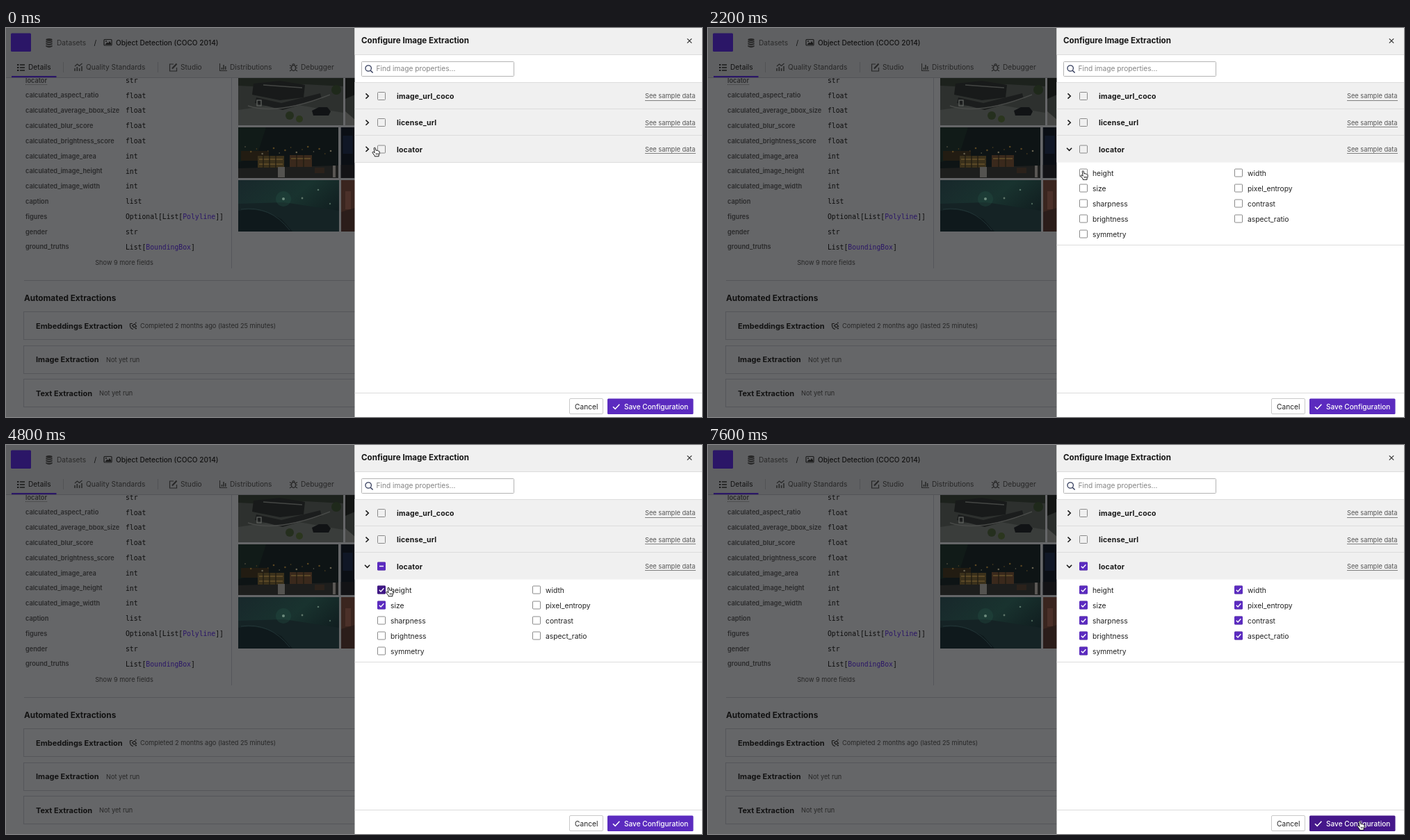
An HTML page for the animation above (8 s loop, 1001 px wide and 560 px high).

```html
<!DOCTYPE html>
<html lang="en">
<head>
<meta charset="utf-8">
<title>Configure Image Extraction</title>
<style>
  html, body { margin: 0; width: 100%; height: 100%; overflow: hidden; background: #fff; }
  svg { display: block; }
  text { font-family: Inter, "Open Sans", sans-serif; white-space: pre; }
  .mono { font-family: "DejaVu Sans Mono", monospace; }
</style>
</head>
<body>
<svg id="stage" width="1001" height="560" viewBox="0 0 1001 560"></svg>
<script>
const stage = document.getElementById('stage');
const PURPLE = '#5b2bbf', DARK = '#3f1785', DIM_PURPLE = '#2b1667';

// ---- drawing helpers (strings of SVG) ----
const text = (x, mid, size, fill, str, extra = '') =>
  `<text x="${x}" y="${mid + size * 0.36}" font-size="${size}" fill="${fill}" ${extra}>${str}</text>`;
const bold = (x, mid, size, fill, str, extra = '') =>
  text(x, mid, size, fill, str, 'font-weight="700" ' + extra);
const rect = (x, y, w, h, fill, extra = '') =>
  `<rect x="${x}" y="${y}" width="${w}" height="${h}" fill="${fill}" ${extra}/>`;
const line = (d, stroke, width = 1, extra = '') =>
  `<path d="${d}" fill="none" stroke="${stroke}" stroke-width="${width}" ${extra}/>`;
const dot = (x, y, r, fill, extra = '') =>
  `<circle cx="${x}" cy="${y}" r="${r}" fill="${fill}" ${extra}/>`;
const shape = (d, fill) => `<path d="${d}" fill="${fill}"/>`;
const frame = (x, y, w, h, body) =>
  `<svg x="${x}" y="${y}" width="${w}" height="${h}" viewBox="0 0 ${w} ${h}">${body}</svg>`;

// ---- dimmed page on the left ----
const fields = [
  ['locator', 'str'], ['calculated_aspect_ratio', 'float'],
  ['calculated_average_bbox_size', 'float'], ['calculated_blur_score', 'float'],
  ['calculated_brightness_score', 'float'], ['calculated_image_area', 'int'],
  ['calculated_image_height', 'int'], ['calculated_image_width', 'int'],
  ['caption', 'list'], ['figures', 'Optional[List[<tspan>Polyline</tspan>]]'],
  ['gender', 'str'], ['ground_truths', 'List[<tspan>BoundingBox</tspan>]']
];

function photos() {
  const train = rect(0, 0, 151, 68, '#2d302e') +
    shape('M0 0H151V12L96 9 60 14 0 11Z', '#1d221d') +
    shape('M0 46 70 36 151 50V68H0Z', '#3a3d3b') +
    shape('M22 8 60 4 96 10 94 28 60 32 20 24Z', '#181a1a') +
    shape('M26 28 62 36 118 22 120 30 64 46 24 36Z', '#1b1d1d') +
    line('M14 40Q56 54 132 24', '#484a48', 1.4) + line('M36 10 92 14', '#444644', 1.6) +
    shape('M106 47l10-5h12l5 6-3 6h-22Z', '#111315') +
    rect(27, 32, 6, 8, 'none', 'stroke="#5f625f" stroke-width="1.3"') +
    dot(74, 54, 6, '#252f1e') + dot(88, 59, 5, '#2b361e') + dot(141, 17, 7, '#1f291b');
  let lamps = '';
  for (let i = 0; i < 16; i++)
    lamps += dot(10 + i * 8.2, 28 + (i * 7) % 11, .8 + i % 2 * .5, i % 3 ? '#594622' : '#66614f');
  const night = rect(0, 0, 144, 74, '#0e1415') +
    shape('M0 0H40L26 44 0 50Z', '#111b18') + shape('M0 59 144 55V74H0Z', '#1d1e1d') +
    rect(4, 34, 40, 14, '#221c12') + rect(28, 41, 38, 17, '#3b311b') + rect(74, 40, 32, 17, '#3a291c') +
    line('M30 46H64M76 45H104M30 53H64', '#65522b', 1.4) +
    line('M36 41V58M45 41V58M54 41V58M84 40V57M94 40V57', '#211d13', 1.4) + lamps +
    rect(57, 57, 10, 15, '#545350') + rect(136, 55, 4, 17, '#5a5754') + rect(110, 58, 14, 8, '#2b221b');
  const road = rect(0, 0, 145, 74, 'url(#teal)') +
    shape('M0 34 66 32 145 44V74H0Z', '#152325') +
    shape('M0 44Q30 38 62 56L78 74H0Z', '#0f191c') +
    line('M4 42Q46 36 74 72', '#223537', 1) +
    dot(65, 27, 11, '#29574a', 'opacity=".3"') + dot(65, 27, 2, '#6c8b7d') +
    dot(115, 14, 1.3, '#58766a') + dot(92, 26, 1.4, '#5d7468') + dot(132, 34, 1.2, '#4b6559');
  return frame(334, 72, 151, 68, train) +
    frame(488, 72, 14, 68, rect(0, 0, 14, 68, '#131514') + shape('M0 30 14 24V68H0Z', '#2a2d2b') + shape('M0 48 14 60V68H0Z', '#474846')) +
    frame(334, 143, 144, 73, night) +
    frame(481.5, 143, 20, 73, rect(0, 0, 20, 73, '#0b0f15') + rect(3, 12, 14, 26, '#101726') + rect(0, 54, 20, 19, '#131316')) +
    frame(334, 219, 145, 74, road) +
    frame(482, 219, 20, 74, rect(0, 0, 20, 74, '#3a251f') + shape('M0 46 20 40V74H0Z', '#2b1d1a') + rect(6, 16, 8, 26, '#4b3029'));
}

function icons() {
  const ink = '#1a1a1a', dim = '#272727';
  return `<g fill="${dim}"><ellipse cx="62" cy="17" rx="4.6" ry="1.9"/>` +
    [19, 22.2, 25.4].map(y => `<path d="M57.4 ${y - .6}q4.6 2.6 9.2 0v2q-4.6 2.8-9.2 0z"/>`).join('') + '</g>' +
    rect(141, 16.5, 11, 8.5, 'none', `stroke="${ink}" stroke-width="1.2" rx="1"`) +
    shape('M142.5 24 145.5 20.5 147 22 149 19 151 22V24Z', ink) + dot(144, 19, 1, ink) +
    line('M20 53H27M20 57H27M20 61H27', ink, 1.3) + line('M16 53H18.4M16 57H18.4M16 61H18.4', ink, 2) +
    line('M99 62V58M102.3 62V56M105.6 62V58M109 62V55', dim, 1.5) + line('M99 55 102.5 52 105.5 54.5 109.5 51', dim, 1.1) +
    line('M241 52H235.5V62H245.5V57', dim, 1.2) + line('M239 58.5 245.5 51.5', dim, 2) +
    line('M307.5 51V61.5H318', dim, 1.1) + line('M310.5 60V57M313 60V53M315.7 60V55', dim, 1.5) +
    `<ellipse cx="413.5" cy="57.5" rx="3" ry="4" fill="none" stroke="${dim}" stroke-width="1.3"/>` +
    line('M408 53.5 410.8 55.5M408 57.5H410.5M408 62 411 60M419 53.5 416.2 55.5M419 57.5H416.5M419 62 416 60M411.5 53Q413.5 50 415.5 53', dim, 1.1) +
    line('M178.5 425.5H182M178.5 425.5V429Q179 433 183 433.5', ink, 1.2) +
    line('M181.5 428.5 185 426 187.5 429.5 184 431Z', ink, 1.2) + line('M185.5 432.5H188M186 424.5H187.5', ink, 1.3);
}

function page() {
  const ink = '#121212', soft = '#272727', rule = '#55565a';
  let s = rect(0, 0, 502, 560, '#656668');
  fields.forEach(([name, type], i) => {
    const y = 75.2 + i * 21.8;
    s += text(28, y, 9.2, '#2a2a2b', name, 'font-weight="600"') +
      text(172, y, 9.76, '#0d0d0d', type.replace('<tspan', `<tspan fill="${DIM_PURPLE}"`), 'class="mono"');
  });
  s += line('M28 81.5H60', '#383838', 1, 'stroke-dasharray="1 1"');
  s += line('M324.5 72V346M26 363.5H502', rule) + photos();
  s += text(170, 338, 9.2, soft, 'Show 9 more fields', 'text-anchor="middle"');
  s += bold(26, 389, 11.8, ink, 'Automated Extractions');
  [['Embeddings Extraction', 193, 'Completed 2 months ago (lasted 25 minutes)'],
   ['Image Extraction', 144, 'Not yet run'], ['Text Extraction', 134, 'Not yet run']]
    .forEach(([title, x, note], i) => {
      const y = 408.5 + i * 48.5;
      s += rect(25.5, Math.floor(y) + .5, 500, 40, 'none', `stroke="${rule}"`) +
        bold(43, y + 20.2, 11, ink, title) + text(x, y + 20.2, 9.2, soft, note);
    });
  s += rect(0, 0, 502, 71, '#5f6062') + line('M0 71.5H502', '#535457');
  s += rect(7, 7.5, 29, 26.5, DIM_PURPLE, 'rx="1.5"');
  s += text(73, 21, 10.2, '#2a2a2a', 'Datasets') + text(126.5, 21, 10.2, ink, '/') +
    text(158, 21, 10.1, ink, 'Object Detection (COCO 2014)', 'font-weight="500"');
  [[32, 'Details'], [115, 'Quality Standards'], [251, 'Studio'], [322, 'Distributions'], [424, 'Debugger']]
    .forEach(([x, name], i) => s += text(x, 56.5, 10.2, i ? soft : ink, name));
  s += line('M82.5 49V64M218.5 49V64', '#515255') + rect(8, 69, 64.5, 2.2, DIM_PURPLE);
  return s + icons();
}

// ---- side panel ----
const options = [];
['height', 'size', 'sharpness', 'brightness', 'symmetry'].forEach((n, i) => options.push([534, 208.5 + i * 22, n]));
['width', 'pixel_entropy', 'contrast', 'aspect_ratio'].forEach((n, i) => options.push([757, 208.5 + i * 22, n]));

const box = (x, mid) => rect(x + .5, mid - 5.5, 11, 11, 'none', 'stroke="#8a8a8a" rx="1"');
const liveBox = (id, x, mid) => box(x, mid) + `<g id="${id}">` +
  rect(x, mid - 6, 12, 12, PURPLE, 'rx="1.2"') +
  line(`M${x + 2.8} ${mid + .2}l2.3 2.3 4.3-4.7`, '#fff', 1.4, 'class="tick"') +
  line(`M${x + 3} ${mid}h6`, '#fff', 1.5, 'class="dash"') + '</g>';

function panel() {
  const grey = '#f0f0f0', rule = '#dcdcdc';
  let s = rect(501.5, 0, 500, 560, '#fff') + rect(501.5, 0, 500, 38, grey) + line('M501.5 38.5H1001', rule);
  s += bold(511, 18.3, 11.6, '#161616', 'Configure Image Extraction');
  s += line('M979.8 15.3 986.2 21.7M986.2 15.3 979.8 21.7', '#333', 1.2);
  s += rect(511.5, 48.5, 219, 21, '#fff', 'stroke="#b4b4b4" rx="1"') +
    dot(521.2, 58, 4.2, 'none', 'stroke="#333c5c" stroke-width="1.3"') + line('M524.3 61.2 527.6 64.5', '#333c5c', 1.5) +
    text(532.5, 58.7, 10.2, '#858585', 'Find image properties...');
  s += rect(501.5, 78, 500, 115.5, grey) + line('M501.5 78.5H1001M501.5 116.5H1001M501.5 154.5H1001', rule);
  ['image_url_coco', 'license_url', 'locator'].forEach((name, i) => {
    const y = 98 + i * 38.2;
    s += bold(562, y + .5, 10.4, '#161616', name, 'letter-spacing=".2"') +
      text(919, y, 9.25, '#555', 'See sample data') +
      line(`M919 ${Math.floor(y + 6) + .5}H992`, '#808080');
    if (i < 2) s += line(`M517.5 ${y - 3.6}l3.8 3.6-3.8 3.6`, '#161616', 1.5) + box(534, Math.floor(y));
  });
  s += '<g id="closed">' + line('M517.5 170.8l3.8 3.6-3.8 3.6', '#161616', 1.5) + line('M501.5 193.5H1001', rule) + '</g>';
  s += liveBox('all', 534, 174.5);
  s += '<g id="open">' + line('M516 172.8l3.6 3.6 3.6-3.6', '#161616', 1.5) + line('M501.5 312.5H1001', rule);
  options.forEach(([x, y, name], i) => s += liveBox('opt' + i, x, y) + text(x + 19, y + .6, 10.3, '#222', name));
  s += '</g>' + line('M501.5 525.5H1001', rule);
  s += rect(810.5, 533.5, 48, 22, '#fff', 'stroke="#c9c9c9" rx="1.5"') +
    text(834.7, 545, 10.2, '#222', 'Cancel', 'text-anchor="middle"');
  s += '<rect id="save" x="865" y="533.5" width="123.5" height="22.5" rx="1.5"/>' +
    line('M873 545.2l3.2 3.2 6.2-6.6', '#fff', 1.5) +
    text(889, 545, 10.1, '#fff', 'Save Configuration', 'font-weight="500"');
  return s;
}

const pointer = `<g id="pointer" stroke="#000" stroke-width=".9" stroke-linejoin="round" fill="#fff">
  <path id="arrow" fill="#000" stroke="#fff" stroke-width=".7" d="M0 0V10.4L2.4 8.2 4 12 5.8 11.2 4.2 7.6H7.4Z"/>
  <g id="hand" transform="translate(-.6 -.6)">
  <path d="M-1.2 .9Q-.2-.4 .9 .9L1.6 4.4Q2.6 3.6 3.4 4.6 4.4 4 5.1 5.2 6.2 4.8 6.7 6V9.2L5.7 11.2V12.9H-.2V11.8L-3.3 7.8Q-3.6 6.2-2 6.4L-.2 7.8Z"/>
  <path fill="none" stroke-width=".7" d="M1.8 8.3V10.6M3.3 8.3V10.6M4.8 8.3V10.6"/></g></g>`;

stage.innerHTML = `<defs><linearGradient id="teal" x2="1" y2=".6">
  <stop offset="0" stop-color="#18282b"/><stop offset=".55" stop-color="#19332f"/><stop offset="1" stop-color="#101d1f"/>
  </linearGradient></defs>` + page() + panel() + pointer;

// ---- motion ----
const LOOP = 8000, STEP = 100;
const path = [ // time, x, y of the pointer tip
  [0, 531, 172.5], [400, 520, 173], [900, 520, 174], [1600, 535, 197], [1800, 537, 203],
  [2200, 540, 206], [2400, 540, 206], [2700, 551, 210.5], [2800, 551, 210.5], [2900, 552, 211.5],
  [3400, 555.5, 223.5], [3900, 555.5, 223.5], [4200, 556, 224.5], [4400, 556, 224.5],
  [5300, 543.5, 179], [6500, 543.5, 179], [6600, 559, 180], [7100, 936, 535.5],
  [7200, 936, 535.5], [7600, 938, 542]
];
const OPEN = 500, FIRST = 2300, SECOND = 3600, HOVER_ALL = 5400, ALL = 5500, LEAVE_ALL = 6600;

const get = id => document.getElementById(id);
const display = (el, on) => { el.style.display = on ? '' : 'none'; };
const ease = p => p * p * (3 - 2 * p);

function tipAt(t) {
  const i = path.findIndex(k => k[0] > t);
  if (i < 0) return path[path.length - 1].slice(1);
  const [a, ax, ay] = path[i - 1], [b, bx, by] = path[i];
  const p = ease((t - a) / (b - a));
  return [ax + (bx - ax) * p, ay + (by - ay) * p];
}

function setBox(id, state, dark) {
  const g = get(id);
  display(g, state);
  g.firstChild.setAttribute('fill', dark ? DARK : PURPLE);
  display(g.querySelector('.tick'), state === 'tick');
  display(g.querySelector('.dash'), state === 'dash');
}

function saveColor(p) {
  const from = [91, 43, 191], to = [69, 23, 138];
  return `rgb(${from.map((c, i) => Math.round(c + (to[i] - c) * p))})`;
}

function draw(now) {
  const t = Math.floor((now % LOOP) / STEP) * STEP;
  const [x, y] = tipAt(t);
  const open = t >= OPEN;
  display(get('closed'), !open);
  display(get('open'), open);

  const over = open ? options.findIndex(([ox, oy]) => Math.abs(y - oy) < 8 && x > ox && x < ox + 60) : -1;
  options.forEach((o, i) => {
    const on = t >= ALL || (i === 0 && t >= FIRST) || (i === 1 && t >= SECOND);
    setBox('opt' + i, on && 'tick', i === over);
  });
  setBox('all', t >= ALL ? 'tick' : t >= FIRST && 'dash', t >= HOVER_ALL && t < LEAVE_ALL);
  get('save').setAttribute('fill', saveColor(Math.min(1, Math.max(0, (t - 7200) / 200))));

  const hand = y < 193 || y > 533 || over >= 0;
  display(get('hand'), hand);
  display(get('arrow'), !hand);
  get('pointer').setAttribute('transform', `translate(${x} ${y})`);
}

const start = performance.now();
function tick() {
  draw(performance.now() - start);
  requestAnimationFrame(tick);
}
tick();
</script>
</body>
</html>
```
